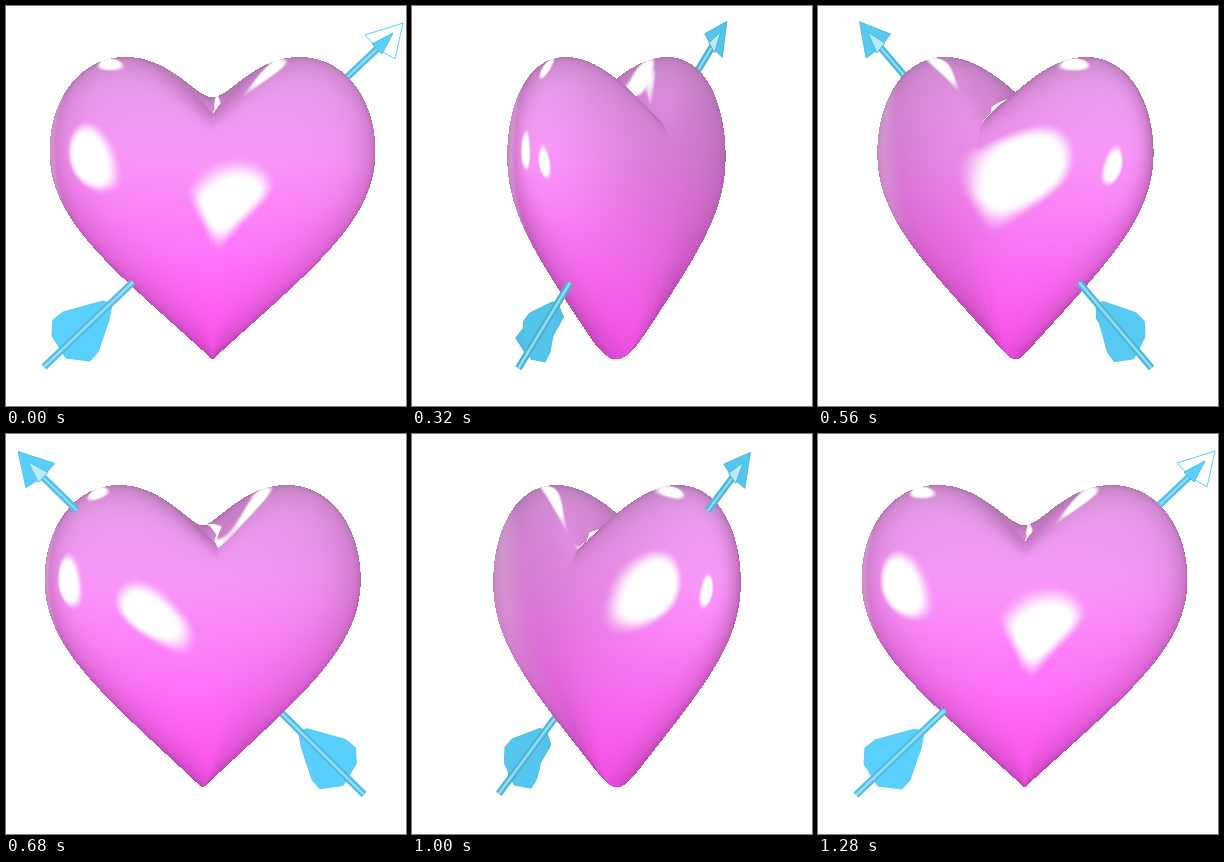
Write an HTML page with a canvas that moves like this. It is 400x400 px and loops after 1320 ms.

```html
<!DOCTYPE html>
<html lang="en">
<head>
<meta charset="utf-8">
<title>Spinning heart</title>
<style>
html, body { margin: 0; width: 100%; height: 100%; overflow: hidden; background: #fff; }
canvas { display: block; width: 400px; height: 400px; }
</style>
</head>
<body>
<canvas id="stage" width="400" height="400"></canvas>
<script>
const ctx = document.getElementById('stage').getContext('2d');
const SIZE = 400, STEP = 40, LOOP = 1320;
const AXIS = 201, SHIFT = 5, MID = 180, DEPTH = 67;

const lerp = (a, b, t) => a + (b - a) * t;
const clamp = v => Math.max(0, Math.min(1, v));
const smooth = (a, b, v) => { const t = clamp((v - a) / (b - a)); return t * t * (3 - 2 * t); };

// Turn angle: smooth curve through a few key poses
const KEY_T = [0, 4, 8, 12, 17, 21, 25, 28, 32];
const KEY_A = [0, 15.5, 54.5, 111.5, 195.5, 260.5, 314.5, 343.5, 360];
const slope = i => i === 0 || i === KEY_T.length - 1 ? 0
  : (KEY_A[i + 1] - KEY_A[i - 1]) / (KEY_T[i + 1] - KEY_T[i - 1]);

function turn(step) {
  let i = 0;
  while (i < KEY_T.length - 2 && step > KEY_T[i + 1]) i++;
  const d = KEY_T[i + 1] - KEY_T[i], t = (step - KEY_T[i]) / d, u = 1 - t;
  const deg = KEY_A[i] * (1 + 2 * t) * u * u + KEY_A[i + 1] * t * t * (3 - 2 * t)
    + d * t * u * (slope(i) * u - slope(i + 1) * t);
  return deg * Math.PI / 180;
}

// Right half of the heart outline, as radius by angle from straight up
const CURVES = [
  [0, 107, 24, 80, 50, 51, 88, 51],
  [88, 51, 132, 51, 163, 92, 163, 145],
  [163, 145, 163, 215, 100, 262, 0, 353]
];
const RES = 720;
const radius = new Float32Array(RES + 2);
{
  const pts = [];
  for (const k of CURVES) for (let i = 0; i <= 200; i++) {
    const t = i / 200, u = 1 - t;
    const on = o => u * u * u * k[o] + 3 * u * u * t * k[o + 2] + 3 * u * t * t * k[o + 4] + t * t * t * k[o + 6];
    const x = on(0), y = on(1) - MID;
    pts.push([Math.atan2(x, -y) / Math.PI * RES, Math.hypot(x, y)]);
  }
  for (let i = 0, j = 0; i <= RES + 1; i++) {
    while (j < pts.length - 2 && pts[j + 1][0] < i) j++;
    const [a, ra] = pts[j], [b, rb] = pts[j + 1];
    radius[i] = b > a ? lerp(ra, rb, clamp((i - a) / (b - a))) : rb;
  }
}
function reach(x, y) {
  const a = Math.atan2(x, -y) / Math.PI * RES, i = Math.floor(a);
  return lerp(radius[i], radius[i + 1], a - i);
}

// Inflated heart: field(x, y) + (z / DEPTH)^2 = 1, creases softened inwards
function field(x, y) {
  const r = Math.hypot(x, y);
  const q = Math.max(0, 1 - (r / reach(Math.abs(x), y)) ** 2);
  const k = y < 0 ? 14 + 30 * q : 26 * q;
  return (r / reach(Math.hypot(x, k), y)) ** 2;
}
const HALF = 172, W = HALF * 2 + 1, TOP = 44, BOTTOM = 360;
const grid = new Float32Array(W * (BOTTOM - TOP));
for (let y = TOP; y < BOTTOM; y++)
  for (let x = 0; x <= HALF; x++) {
    const row = (y - TOP) * W + HALF;
    grid[row + x] = grid[row - x] = field(x, y - MID);
  }

// Colours from top to bottom, towards the light and away from it
const LIT = [[230, 160, 234], [248, 150, 248], [255, 116, 250], [255, 80, 238]];
const DIM = [[208, 140, 208], [212, 122, 208], [226, 100, 218], [222, 75, 210]];
const ramp = (stops, y, ch) => {
  const v = clamp((y - 50) / 300) * 3, i = Math.min(2, Math.floor(v));
  return lerp(stops[i][ch], stops[i + 1][ch], v - i);
};

// Highlights: normal x, y and size
const LIGHTS = [[-0.447, 0, 0.145], [0.05, 0.07, 0.105], [-0.25, -0.83, 0.14]];

function renderHeart(angle) {
  const c = Math.cos(angle), s = Math.sin(angle);
  const layer = document.createElement('canvas');
  layer.width = layer.height = SIZE;
  const g = layer.getContext('2d'), img = g.createImageData(SIZE, SIZE);
  const depth = new Float32Array(SIZE), atX = new Float32Array(SIZE), atZ = new Float32Array(SIZE);

  const span = (x0, z0, x1, z1) => {
    let a = AXIS + (x0 + SHIFT) * c + z0 * s, b = AXIS + (x1 + SHIFT) * c + z1 * s;
    if (a > b) { [a, b, x0, x1, z0, z1] = [b, a, x1, x0, z1, z0]; }
    for (let p = Math.ceil(a); p <= b; p++) {
      const t = b > a ? (p - a) / (b - a) : 0;
      const x = lerp(x0, x1, t), z = lerp(z0, z1, t), d = z * c - x * s;
      if (d > depth[p]) { depth[p] = d; atX[p] = x; atZ[p] = z; }
    }
  };

  for (let y = TOP + 1; y < BOTTOM - 1; y++) {
    const row = (y - TOP) * W;
    depth.fill(-1e4);
    for (let i = 0; i < W - 1; i++) {
      const f0 = grid[row + i], f1 = grid[row + i + 1];
      if (f0 >= 1 && f1 >= 1) continue;
      const cut = (1 - f0) / (f1 - f0);
      const x0 = i - HALF + (f0 > 1 ? cut : 0), x1 = i - HALF + (f1 > 1 ? cut : 1);
      const z0 = DEPTH * Math.sqrt(Math.max(0, 1 - f0)), z1 = DEPTH * Math.sqrt(Math.max(0, 1 - f1));
      span(x0, z0, x1, z1);
      span(x0, -z0, x1, -z1);
    }
    for (let p = 0; p < SIZE; p++) {
      if (depth[p] < -9e3) continue;
      const gx = Math.max(1, Math.min(W - 3, atX[p] + HALF)), i = Math.floor(gx), t = gx - i, o = row + i;
      const fx = lerp(grid[o + 1] - grid[o - 1], grid[o + 2] - grid[o], t) / 2;
      const fy = lerp(grid[o + W] - grid[o - W], grid[o + W + 1] - grid[o - W + 1], t) / 2;
      const fz = 2 * atZ[p] / (DEPTH * DEPTH), len = Math.hypot(fx, fy, fz) || 1;
      const nx = (fx * c + fz * s) / len, ny = fy / len, nz = (fz * c - fx * s) / len;

      const lit = smooth(0.5, 1.03, nz);
      const shade = 0.8 + 0.2 * clamp(nz * 1.8);
      let white = 0.22 * smooth(0.8, 0.93, -nx);
      for (const [lx, ly, r] of LIGHTS) {
        const d = Math.hypot(nx - lx, ny - ly);
        if (nz > 0) white = Math.max(white, 1 - smooth(r * 0.75, r * 1.3, d));
      }
      const q = (y * SIZE + p) * 4;
      for (let ch = 0; ch < 3; ch++) {
        const base = lerp(ramp(DIM, y, ch), ramp(LIT, y, ch), lit);
        img.data[q + ch] = lerp(base * shade, 255, white);
      }
      img.data[q + 3] = 255;
    }
  }
  g.putImageData(img, 0, 0);
  return layer;
}

// Arrow parts, in the heart's own plane; the fin stands across it
const HEAD = [[397, 17], [359, 29], [372, 43], [389, 53]];
const WEDGE = [[387, 27], [366, 38], [376, 48]];
const FLETCH = [[47, 314], [57, 306], [97, 295], [106, 298], [103, 314], [92, 346], [84, 355], [60, 352], [46, 330]];
const FIN = [[106, 297, 0], [92, 310, 17], [70, 331, 18], [52, 348, 0], [70, 331, -26], [90, 312, -22]];

function drawArrow(angle, isTip) {
  const c = Math.cos(angle), s = Math.sin(angle), facing = c * c;
  const blue = k =>
    `rgb(${lerp(80, 90, facing) * k},${lerp(190, 208, facing) * k},${lerp(224, 255, facing) * k})`;
  const trace = pts => {
    ctx.beginPath();
    for (const [x, y, z = 0] of pts) {
      const dx = x - AXIS;
      ctx.lineTo(AXIS + dx * c + z * s, y + 0.01 * (z * c - dx * s));
    }
  };
  const shape = (pts, fill, line) => {
    trace(pts);
    ctx.closePath();
    ctx.fillStyle = fill;
    ctx.fill();
    ctx.strokeStyle = line;
    ctx.lineWidth = 1;
    ctx.stroke();
  };
  const rod = (pts, width, color) => {
    trace(pts);
    ctx.lineWidth = width;
    ctx.strokeStyle = color;
    ctx.stroke();
  };
  if (isTip) {
    const glare = c > 0.98;
    const shaft = [[336, 76], [374, 40]];
    rod(shaft, 7, blue(0.92));
    rod(shaft, 2, '#94dff8');
    shape(HEAD, glare ? '#fff' : blue(1), blue(glare ? 1 : 0.93));
    shape(WEDGE, glare ? blue(1) : '#b8ecfa', blue(0.9));
  } else {
    const shaft = [[127, 276], [38, 361]];
    shape(FIN, blue(0.98), blue(0.95));
    shape(FLETCH, blue(1), blue(0.97));
    rod(shaft, 7, blue(0.9));
    rod(shaft, 2.5, '#94dff8');
  }
}

const hearts = [];
let shown = -1;

function draw(step) {
  const angle = turn(step), tipInFront = Math.sin(angle) < -0.01;
  hearts[step] = hearts[step] || renderHeart(angle);
  ctx.fillStyle = '#fff';
  ctx.fillRect(0, 0, SIZE, SIZE);
  drawArrow(angle, !tipInFront);
  ctx.drawImage(hearts[step], 0, 0);
  drawArrow(angle, tipInFront);
}

const start = performance.now();
function tick() {
  const step = Math.floor((performance.now() - start) % LOOP / STEP) % 32;
  if (step !== shown) draw(shown = step);
  requestAnimationFrame(tick);
}
tick();
</script>
</body>
</html>
```
